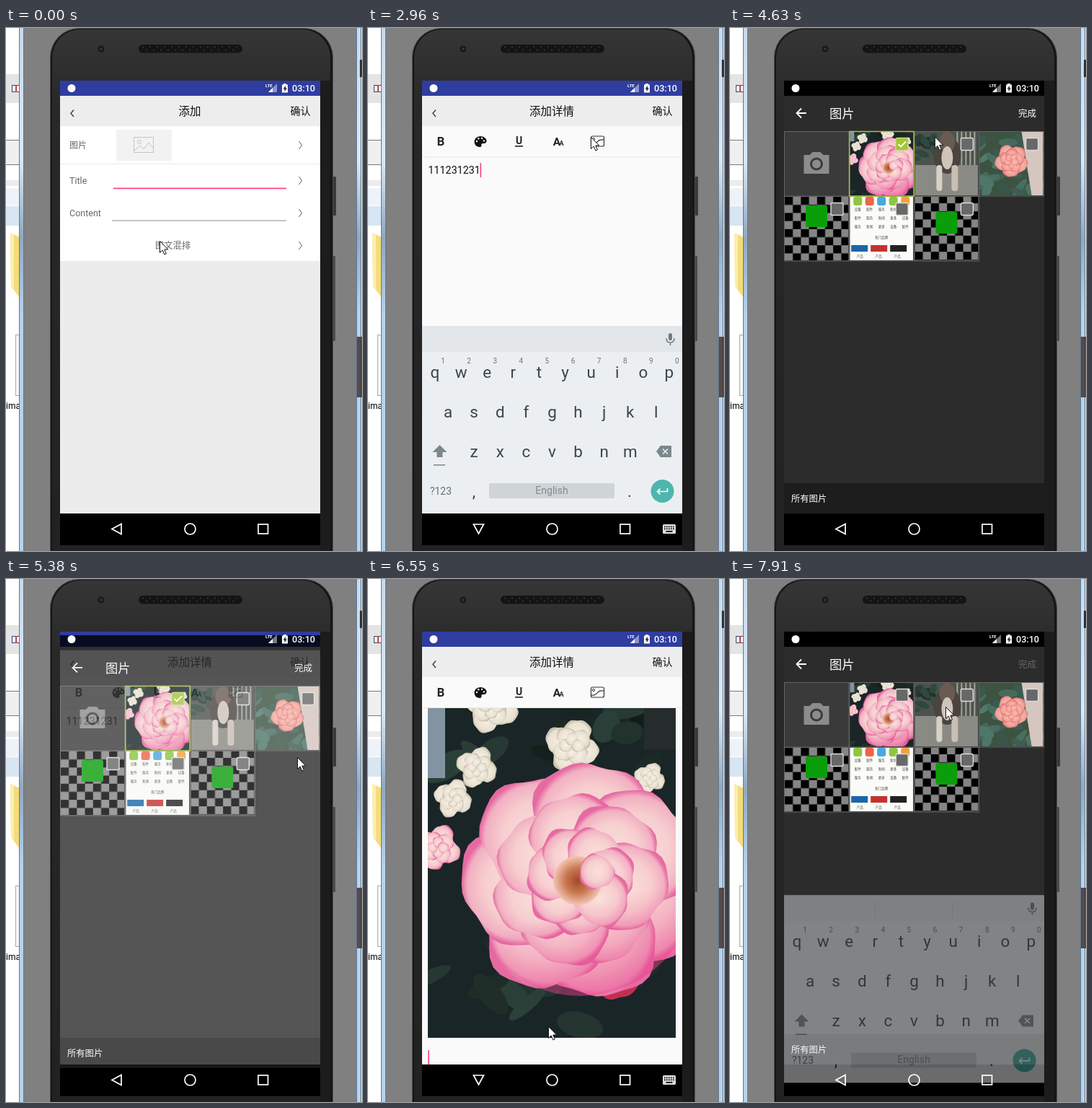
An HTML page for the animation above (8 s loop, 494 by 725 pixels).

```html
<!DOCTYPE html>
<html lang="zh-CN">
<head>
<meta charset="utf-8">
<title>图文混排</title>
<style>
html, body { margin: 0; width: 100%; height: 100%; overflow: hidden; background: #808080; }
svg { display: block; position: fixed; left: 0; top: 0; }
text { font-family: Roboto, "Noto Sans CJK SC", "Noto Sans CJK", sans-serif; white-space: pre; }
</style>
</head>
<body>
<svg id="stage" width="494" height="725" viewBox="0 0 494 725"></svg>
<script>
const LOOP = 8000, PINK = '#ff4081';
const $ = id => document.getElementById(id);
const range = (n, f) => Array.from({ length: n }, (_, i) => f(i)).join('');

let seed = 7;
const rnd = (a, b) => a + (b - a) * ((seed = seed * 16807 % 2147483647) / 2147483647);

// shape helpers
const rect = (x, y, w, h, fill, more = '') => `<rect x="${x}" y="${y}" width="${w}" height="${h}" fill="${fill}" ${more}/>`;
const oval = (x, y, rx, ry, fill, more = '') => `<ellipse cx="${x}" cy="${y}" rx="${rx}" ry="${ry}" fill="${fill}" ${more}/>`;
const dot = (x, y, r, fill, more) => oval(x, y, r, r, fill, more);
const path = (d, fill, more = '') => `<path d="${d}" fill="${fill}" ${more}/>`;
const line = (d, color, w = 1) => path(d, 'none', `stroke="${color}" stroke-width="${w}"`);
const text = (x, y, s, size, fill, anchor = 'start', more = '') =>
  `<text x="${x}" y="${y}" font-size="${size}" fill="${fill}" text-anchor="${anchor}" ${more}>${s}</text>`;
const group = (id, body, more = '') => `<g id="${id}" ${more}>${body}</g>`;
const moved = (x, y, body) => `<g transform="translate(${x} ${y})">${body}</g>`;
const clip = (id, x, y, w, h) => `<clipPath id="${id}">${rect(x, y, w, h, '#000')}</clipPath>`;
const gradient = (id, kind, colors, more = '') => `<${kind}Gradient id="${id}" ${more}>` +
  colors.map(([at, c]) => `<stop offset="${at}" stop-color="${c}"/>`).join('') + `</${kind}Gradient>`;

// flowers: rings of ruffled petals
function petal(x, y, r, fill) {
  const p = rnd(0, 6), q = rnd(0, 6);
  const points = range(40, i => {
    const a = i * Math.PI / 20, d = r * (1 + .06 * Math.sin(3 * a + p) + .03 * Math.sin(7 * a + q));
    return `${(x + d * Math.cos(a)).toFixed(1)},${(y + d * Math.sin(a)).toFixed(1)} `;
  });
  return `<polygon points="${points}" fill="${fill}"/>`;
}
function bloom(x, y, r, n, paint) {
  return range(3, ring => {
    const size = r * (1 - ring * .27), turn = ring * .6 + .4;
    return range(n, i => {
      const a = turn + i * 2 * Math.PI / n;
      return petal(x + Math.cos(a) * size * .5, y + Math.sin(a) * size * .5, size * .5, `url(#${paint})`);
    });
  });
}
function leaves(n, w, h, size, light) {
  return range(n, () => {
    const x = rnd(0, w), y = rnd(0, h);
    return oval(x, y, rnd(.6, 1) * size, rnd(.25, .5) * size, `hsl(158 20% ${rnd(light - 7, light + 5)}%)`, `transform="rotate(${rnd(-70, 70)} ${x} ${y})"`);
  });
}

const rosePhoto = () => rect(0, 0, 344, 510, '#1a2527') + leaves(45, 344, 510, 36, 16) + rect(0, 0, 24, 150, '#8293a2') +
  range(3, i => path(`M${105 + i * 54} 0h46l-10 46h-28z`, ['#7b2925', '#8e332c', '#6d2925'][i])) + rect(300, 0, 44, 110, '#262b2c') +
  [[88, 50, 38], [68, 135, 29], [35, 178, 27], [200, 105, 38], [308, 150, 22]].map(([x, y, r]) => bloom(x, y, r, 4, 'cream')).join('') +
  bloom(14, 246, 32, 4, 'blush') + petal(156, 178, 16, '#d64a72') + petal(262, 425, 32, '#c22f52') +
  bloom(212, 292, 166, 7, 'blush') + dot(208, 292, 34, 'url(#heart)') + petal(234, 280, 24, 'url(#blush)') +
  oval(212, 292, 160, 160, 'url(#shade)');

const dogPhoto = rect(0, 0, 88, 88, '#8a8a84') + rect(0, 0, 88, 46, '#4c534c') + leaves(8, 30, 40, 12, 22) +
  range(6, i => rect(58 + i * 6, 0, 2, 46, '#a2a59c')) + oval(45, 32, 19, 26, '#4a4340') + oval(45, 14, 11, 14, '#6a5b52') +
  oval(45, 36, 8, 16, '#cfc4b8') + rect(30, 46, 8, 36, '#d8d0c6', 'rx="4"') + rect(51, 46, 9, 36, '#c9bfb4', 'rx="4"');

const salmonPhoto = rect(0, 0, 88, 88, '#3c5341') + leaves(30, 88, 88, 15, 35) + path('M58 0H88V88H72Z', '#d6c6c0') + bloom(44, 40, 23, 5, 'salmon');

const catalog = rect(0, 0, 88, 88, '#fbfcf8') +
  ['#8dc63f', '#f0644b', '#4aa8dd', '#8dc63f', '#f0a13c'].map((c, i) => rect(5 + i * 16.5, 0, 12, 12, c, 'rx="3"')).join('') +
  range(3, r => range(5, i => text(11 + i * 16.5, 19 + r * 12, ['设备', '配件', '服务', '新闻', '更多'][(i + r) % 5], 4.5, '#444', 'middle'))) +
  text(44, 58, '热门品牌', 4.5, '#444', 'middle') +
  ['#1a66a8', '#c4322f', '#222'].map((c, i) => rect(2 + i * 27, 67, 23, 9, c)).join('') +
  range(3, i => text(14 + i * 26, 84, '产品', 4.5, '#555', 'middle'));

const checker = (x, y) => moved(0, y, rect(0, -22, 88, 120, 'url(#check)') + rect(x, 12, 30, 30, '#0b9e0b', 'rx="2"'));
const emptyPic = rect(0, 0, 88, 88, '#2b2b2b') + rect(11, 10, 67, 67, '#000', 'rx="8"') + path('M18 66L36 42 48 56 56 48 70 66Z', '#2b2b2b');
const camera = rect(0, 0, 88, 88, '#3a3a3a') + path('M26.500 32h8l4-4h11l4 4h8v26h-35z', '#8c8c8c') + dot(44, 44.5, 9, '#3a3a3a') + dot(44, 44.5, 6, '#8c8c8c');

function cell(i, body) {
  return moved(76 + i % 4 * 90.2, 144 + (i >> 2) * 90, `<g clip-path="url(#thumb)">${body}</g>` +
    rect(-.5, -.5, 89.5, 89.5, 'none', 'stroke="#666"') +
    (i ? rect(64, 8.5, 17, 17, '#686868', 'rx="2" stroke="#ddd" stroke-width="1.4"') : ''));
}

const desktop = rect(0, 0, 494, 725, '#808080') + rect(0, 0, 19, 725, '#fff') + rect(0, 64, 19, 40, '#e4e4e4') +
  rect(8.5, 79.5, 11, 9, '#fff', 'stroke="#34406e"') + rect(13, 79, 2, 10, '#b44') +
  rect(0, 155, 19, 35, '#f0f0f0') + line('M0 155.500H19M0 189.500H19', '#777') + rect(0, 211, 19, 8, '#ececec') +
  rect(0, 222, 19, 24, '#eef3f9') + rect(0, 247, 19, 27, '#d8e6f4') +
  path('M6 284L19 290V374L7 358Z', '#f5dc7b') + path('M6 284L11 286V362L7 358Z', '#fbeeb0') +
  rect(13.5, 425.5, 8, 84, '#f7f7f7', 'stroke="#aaa"') + text(0, 528, 'ima', 12, '#000') +
  [18, 486].map(x => rect(x, 0, 7, 725, 'url(#edge)') + rect(x, 0, 1, 725, '#5f7690') + rect(x + 6, 0, 1, 725, '#5f7690')).join('') +
  rect(493, 0, 1, 725, '#f4f4f4') + rect(491, 44, 3, 24, '#333') + rect(487, 428, 7, 84, '#45332f', 'opacity=".85"');

const phone = rect(454, 206, 4, 54, '#3a3a3a', 'rx="1"') + rect(454, 316, 3, 118, '#4a4a4a', 'rx="1"') +
  rect(61.5, .5, 392, 800, '#161616', 'rx="40" stroke="#484848"') + rect(64, 2, 386, 800, 'url(#body)', 'rx="39"') +
  dot(132, 29, 4.5, '#191919') + dot(132, 29, 1.8, '#343b48') + rect(184, 23, 144, 11.5, '#141414', 'rx="5.7"') +
  range(27, i => dot(190 + i * 5, 26.5 + i % 2 * 4, 1, '#3b3b3b')) + rect(436, 73, 14, 652, '#1c1c1c') + rect(75, 73, 361, 644, '#000');

const chevron = y => line(`M406.500 ${y - 5}l4 5.500-4 5.500`, '#777', 1.1);
const header = title => rect(75, 73, 361, 21, '#2f3da0') + rect(75, 94, 361, 42, '#ededed') + line('M94 113.500l-4 4.700 4 4.700', '#444', 1.5) +
  text(255, 121, title, 15.5, '#111', 'middle') + text(394.5, 120, '确认', 14, '#111');

const addPage = rect(75, 136, 361, 537, '#ececec') + rect(75, 136, 361, 187, '#fff') + rect(75, 188, 361, 1, '#eaeaea') +
  group('press', rect(75, 279, 361, 44, '#e0e0e0')) + header('添加') +
  text(88, 167, '图片', 12, '#666') + rect(153, 141, 77, 43, '#f2f2f2') +
  rect(177.5, 151.5, 27, 21, 'none', 'stroke="#c5c5c5"') + dot(185, 158, 2.5, 'none', 'stroke="#c5c5c5"') + line('M178 170l8-7 5 5 7-9 6 7', '#c5c5c5') +
  text(88, 216, 'Title', 12.5, '#666') + text(88, 261, 'Content', 12.5, '#666') +
  rect(149, 221.5, 240, 1.7, PINK) + rect(147, 266.5, 242, 1, '#8a8a8a') + text(207, 306, '图文混排', 12.3, '#666') +
  [162, 211, 256, 301].map(chevron).join('');

const bold = (x, y, s, size) => text(x, y, s, size, '#222', 'middle', 'font-weight="700"');
const tools = group('ripple', dot(319, 157, 16, '#000', 'opacity=".13"')) + bold(101, 163, 'B', 16.5) +
  path('M156 150q9 1 8.500 7.500-1 3-5 2.500-3 0-2 3 0 2-3 2-7-1-7-8 1-6.500 8.500-7z', '#111') +
  range(4, i => dot(156 - 5 * Math.cos(i), 157 - 4.5 * Math.sin(i), 1.2, '#fafafa')) +
  bold(209.5, 161, 'U', 14) + rect(204, 163, 11, 1.6, '#222') + bold(262, 163, 'A', 15.5) + bold(268.5, 163, 'A', 9) +
  rect(309.5, 150, 18, 14, 'none', 'rx="2" stroke="#333" stroke-width="1.2"') + dot(313, 154, 1.6, 'none', 'stroke="#333"') +
  line('M310 161q5 1 8-3t9-3', '#333', 1.2);

const photoButtons = range(3, i => dot(361 + i * 26.5, 235, 12.3, '#fff', 'stroke="#8bd04a" stroke-width="1.2"')) +
  line('M363 229H355V241H367V236M360 236l8-8', '#222', 2) + line('M381.500 236v-3.500h11m-3-3l3 3-3 3M393.500 235v3.500h-11m3-3l-3 3 3 3', '#222', 1.6) +
  path('M409.500 231h9l-1 11h-7z', '#222') + line('M408 229.500h12M412 227.500h4', '#222', 1.6) + line('M412.500 233v7M415.500 233v7', '#fff', .8);

const detail = rect(75, 136, 361, 537, '#fafafa') + '<g clip-path="url(#paper)">' + group('scroll',
    text(84, 202, '内容输入...', 14, '#a0a0a0', 'start', 'id="hint"') + text(83.5, 202, '', 14.3, '#111', 'start', 'id="top"') +
    group('photo', moved(83, 221, group('rose', rosePhoto(), 'clip-path="url(#frame)"')) + photoButtons) +
    text(83.5, 763, '', 14.3, '#111', 'start', 'id="low"') + rect(0, 0, 1.6, 20, PINK, 'id="caret"')) + '</g>' +
  rect(75, 136, 361, 43, '#fafafa') + rect(75, 178, 361, 1, '#e9e9e9') + header('添加详情') + tools;

const gallery = rect(75, 73, 361, 21, '#000') + rect(75, 94, 361, 579, '#2c2c2c') + rect(75, 631, 361, 42, '#1d1d1d') +
  line('M106 118H93m6-6.500L92.500 118l6.500 6.500', '#fff', 1.8) + text(138, 125, '图片', 17.3, '#fff') + text(400, 123, '完成', 12.5, '#666', 'start', 'id="done"') +
  [camera, '<use href="#rose" transform="scale(.259) translate(0 -100)"/>', dogPhoto, salmonPhoto, checker(29, 0), catalog,
    checker(29, 9) + group('blank', emptyPic)].map((body, i) => cell(i, body)).join('') +
  group('picked', rect(165.7, 143.5, 89.5, 89.5, 'none', 'stroke="#a4c639" stroke-width="1.5"') +
    rect(230, 152.5, 17, 17, '#a4c639', 'rx="2" stroke="#c9de84"') + line('M233.500 161l3.500 3.500 7-7', '#fff', 1.8)) +
  text(85, 657, '所有图片', 12.3, '#fff');

const KEY = 36.1;
const keyRow = (s, x, y, size = 22.5, color = '#37474f') => range(s.length, i => text(x + i * KEY, y, s[i], size, color, 'middle'));
const keyboard = rect(75, 413, 361, 260, '#eceff1') + rect(75, 413, 361, 36, '#e3e7ea') +
  group('bars', rect(201, 422, 1, 22, '#cdd2d5') + rect(308, 422, 1, 22, '#cdd2d5')) +
  rect(417, 423, 5, 10, '#6f7b80', 'rx="2.5"') + line('M414 430q0 6 5.500 6t5.500-6M419.500 436v4', '#6f7b80', 1.5) +
  ['qwertyuiop', 'asdfghjkl', 'zxcvbnm'].map((s, i) => keyRow(s, 93 + [0, .5, 1.5][i] * KEY, 485 + i * 55)).join('') +
  keyRow('1234567890', 104, 465, 10, '#66757b') +
  path('M99.500 578l10 10h-6v7h-8v-7h-6z', '#7b878c') + rect(91, 605, 16, 1.5, '#7b878c') +
  path('M400 587l6-8h15v16h-15z', '#7b878c') + line('M409 583.500l7 7m0-7l-7 7', '#eceff1', 1.6) +
  text(101, 647, '?123', 14, '#607078', 'middle') + keyRow(',', 147, 650) +
  rect(168, 631, 174, 21, '#cfd4d7', 'rx="2"') + text(255, 646, 'English', 14, '#808b90', 'middle') + keyRow('.', 363, 650) +
  dot(408.5, 642, 16, '#4db6ac') + line('M415.500 638v4.500h-14m4-4l-4 4 4 4', '#fff', 1.7);

const status = dot(91, 83.5, 5.5, '#fff') + text(360, 82, 'LTE', 6, '#fff', 'start', 'font-weight="700"') +
  path('M376 77v12h-12z', '#fff', 'opacity=".45"') + path('M370 83v6h-6z', '#fff') +
  path('M383 78.500h2v-1.500h4v1.500h2v11h-8z', '#fff') + path('M388 80l-3.500 4.500h2v3.500l3.500-4.500h-2z', '#223') +
  text(397, 88, '03:10', 12.6, '#fff', 'start', 'font-weight="500"');

const navButtons = group('back', line('M160 687.500v14l-13-7z', '#fff', 1.7)) + group('down', line('M146.500 688h14l-7 13z', '#fff', 1.7) +
  rect(409, 688, 18, 13, '#ddd', 'rx="1.5"') + range(10, i => rect(411 + i % 5 * 3, 690.5 + (i / 5 | 0) * 3, 1.7, 1.7, '#000')) + rect(413.5, 697, 9, 1.7, '#000')) +
  dot(255.5, 694.5, 7.5, 'none', 'stroke="#fff" stroke-width="1.7"') + rect(350, 688, 13.5, 13, 'none', 'stroke="#fff" stroke-width="1.7"');

const defs = gradient('body', 'linear', [[0, '#363636'], [.12, '#292929'], [1, '#212121']], 'x2="0" y2="1"') +
  gradient('edge', 'linear', [[0, '#c3daef'], [.25, '#dbe9f7'], [.4, '#8fa9c1'], [.55, '#b5d2ee']], 'x2="0" y2="1"') +
  gradient('blush', 'radial', [[0, '#fae0da'], [.6, '#f7cfd0'], [.9, '#f2b0c2'], [1, '#e66aa2']]) +
  gradient('cream', 'radial', [[0, '#f6f1e6'], [.8, '#e9e1d2'], [1, '#c9c0ab']]) +
  gradient('salmon', 'radial', [[0, '#f9c0b4'], [.8, '#f2a097'], [1, '#dc7274']]) +
  gradient('heart', 'radial', [[0, '#a4482a'], [.5, '#c9774f'], [1, '#f3c6b4']]) +
  gradient('shade', 'linear', [[.62, '#e8408c00'], [1, '#e8408c90']], 'x1=".3" y1="0" x2=".6" y2="1"') +
  '<pattern id="check" width="22.4" height="22.4" patternUnits="userSpaceOnUse">' + rect(0, 0, 23, 23, '#858585') +
  rect(0, 0, 11.2, 11.2, '#000') + rect(11.2, 11.2, 11.2, 11.2, '#000') + '</pattern>' +
  clip('screen', 75, 73, 361, 644) + clip('paper', 75, 179, 361, 494) + clip('frame', 0, 0, 344, 510) + clip('thumb', 0, 0, 88, 88);

$('stage').innerHTML = `<defs>${defs}</defs>` + desktop + phone +
  '<g clip-path="url(#screen)">' + addPage + group('detail', detail) + group('gallery', gallery) +
  group('keys', keyboard) + status + navButtons + '</g>' +
  group('mouse', path('M.5.500v16l3.700-3.500 2.700 6 2.500-1.100-2.600-5.900h5z', '#fff', 'stroke="#111"'));

// the screen refreshes every TICK, counted anew from each action
const TICK = 135, actions = [0, 590, 1800, 3390, 3660, 5230, 6290, 7460];
const ramp = (t, a, b) => Math.max(0, Math.min(1, (t - a) / (b - a)));
const smooth = k => k * k * (3 - 2 * k);

// stops of the pointer: [arrival, x, y]
const stops = [[0, 213, 295], [1530, 305, 187], [2500, 309, 151], [3795, 306, 165], [4230, 236, 160], [4930, 406, 126],
  [5365, 404, 247], [5770, 280, 485], [6290, 250, 620], [6965, 294, 179], [7235, 307, 158], [7865, 299, 177]];
function pointer(t) {
  let [last, x, y] = stops[0];
  for (const [end, x2, y2] of stops.slice(1)) {
    const k = smooth(ramp(t, Math.max(last, end - 500), end));
    x += (x2 - x) * k;
    y += (y2 - y) * k;
    last = end;
  }
  return [x, y];
}

const show = (id, on) => $(id).setAttribute('visibility', on ? 'inherit' : 'hidden');
const shift = (id, x, y) => $(id).setAttribute('transform', `translate(${x} ${y})`);
const typed = (s, t, from) => s.slice(0, Math.max(0, Math.floor((t - from) / 100)));

// a layer rises while fading in and sinks while fading out
function layer(id, travel, t, ...spans) {
  const alpha = spans.reduce((sum, [on, off]) => sum + ramp(t, on, on + 170) - ramp(t, off, off + 170), 0);
  shift(id, 0, travel * (1 - alpha));
  $(id).setAttribute('opacity', alpha);
  show(id, alpha > 0);
}

function draw(now) {
  const from = actions.findLast(a => a <= now);
  const t = from + Math.floor((now - from) / TICK) * TICK;
  const between = (a, b) => t >= a && t < b;
  const top = typed('111231231', t, 1980), low = typed('21313', t, 6460);
  const hasPhoto = t > 5600, picked = between(4230, 5600), typing = between(1800, 3660) || between(6420, 7770);

  layer('detail', 24, t, [770, LOOP]);
  layer('gallery', 24, t, [3600, 5330], [7650, LOOP]);
  layer('keys', 46, t, [1860, 3688], [6430, 7771]);
  shift('mouse', ...pointer(t));
  shift('scroll', 0, -95 * ramp(t, 5770, 6170) - 320 * ramp(t, 6425, 6560));

  $('top').textContent = top;
  $('low').textContent = low;
  $('top').setAttribute('y', hasPhoto ? 200 : 202);
  $('caret').setAttribute('x', 83.3 + 8.03 * (hasPhoto ? low : top).length);
  $('caret').setAttribute('y', hasPhoto ? 748 : 187);
  $('done').setAttribute('fill', picked ? '#fff' : '#666');

  show('caret', t < 3800 || t > 6400);
  show('hint', !top);
  show('photo', hasPhoto);
  show('press', between(590, 1000));
  show('ripple', between(3390, 3700) || between(7460, 7700));
  show('bars', t > 6000);
  show('picked', picked);
  show('blank', t < 3900);
  show('down', typing);
  show('back', !typing);
}

const start = performance.now();
function loop() {
  draw((performance.now() - start) % LOOP);
  requestAnimationFrame(loop);
}
loop();
</script>
</body>
</html>
```
